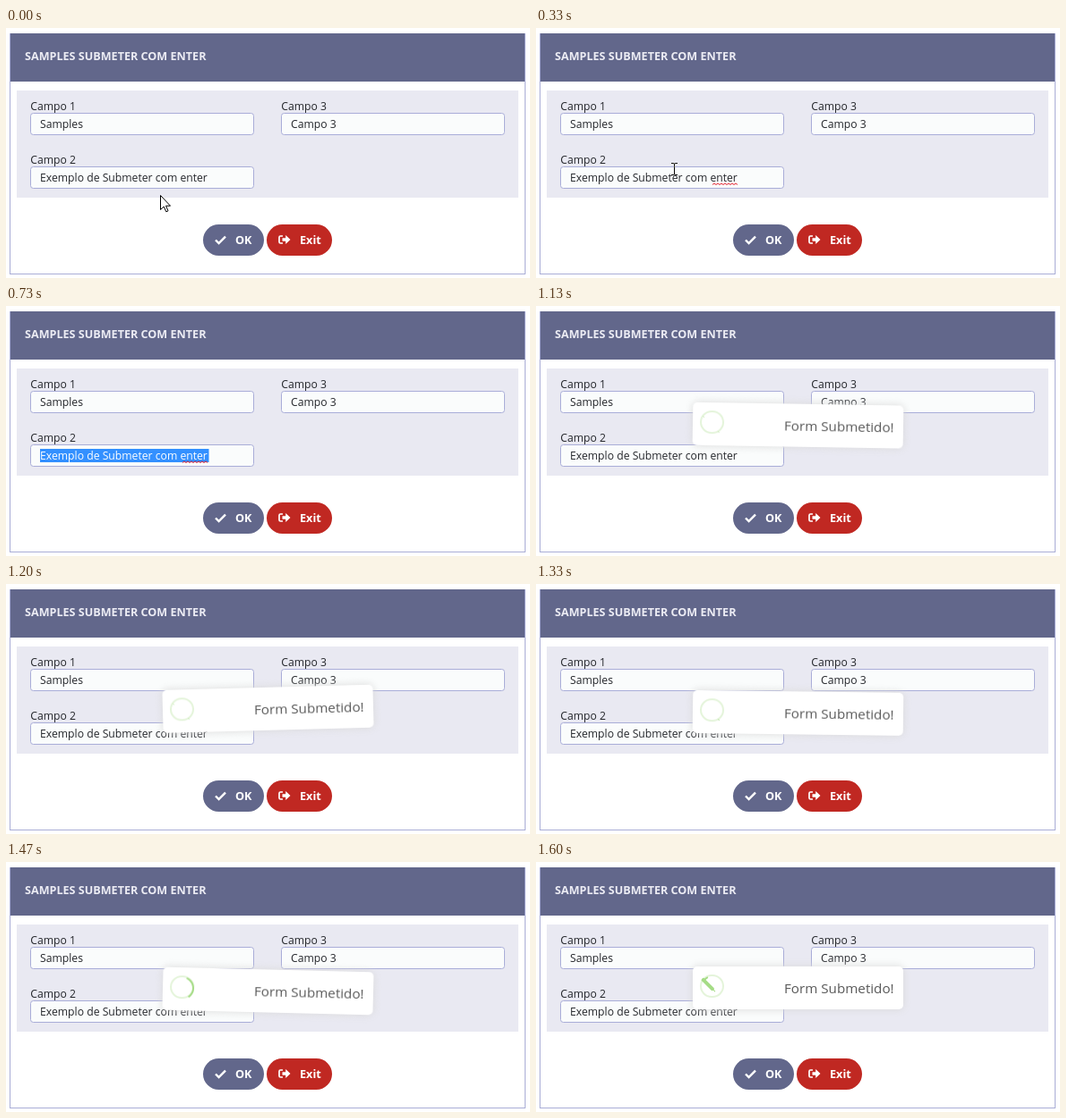
An HTML page for the animation above (1.67 s loop, 585 by 280 pixels).

```html
<!DOCTYPE html>
<html lang="pt">
<head>
<meta charset="utf-8">
<title>Submeter com enter</title>
<style>
html, body { margin: 0; width: 100%; height: 100%; overflow: hidden; background: #fff; }
#stage { position: relative; width: 585px; height: 280px; overflow: hidden; font-family: "Open Sans", "Noto Sans", sans-serif; }
svg { position: absolute; left: 0; top: 0; font-size: 12.2px; fill: #24262b; }
.field { fill: #fafcfc; stroke: #a9add8; }
.strong { font-size: 12.7px; font-weight: 700; fill: #fff; }
#ibeam { mix-blend-mode: difference; }

#toast { --age: 0; position: absolute; left: 175px; top: 117px; width: 235px; height: 48px; overflow: hidden;
  border-radius: 5px; background: #fff; box-shadow: 0 0 10px #d9d9d9; visibility: hidden; }
#toast, #toast .moving { animation: toast-in .5s calc(var(--age) * -1ms) both paused; }
.title { position: absolute; left: 102px; top: 0; font-size: 15.2px; line-height: 48px; color: #595959; white-space: nowrap; }
.icon { position: absolute; left: 9px; top: 9.5px; width: 2em; height: 2em; font-size: 11.2px;
  border: .25em solid #a5dc86; border-radius: 50%; }
.icon div { position: absolute; }
.ring { z-index: 2; left: -.25em; top: -.25em; width: 2em; height: 2em; border: .25em solid rgba(165, 220, 134, .3); border-radius: 50%; }
.mask { width: 1.6em; height: 3em; background: #fff; transform: rotate(-45deg); }
.mask.left { left: -.5em; top: -.8em; transform-origin: 2em 2em; border-radius: 4em 0 0 4em; }
.mask.right { left: .9375em; top: -.25em; transform-origin: 0 1.5em; border-radius: 0 4em 4em 0; }
.gap { z-index: 1; left: .4375em; top: 0; width: .4375em; height: 2.6875em; background: #fff; transform: rotate(-45deg); }
.line { z-index: 2; height: .3125em; border-radius: .125em; background: #a5dc86; }
.tip { transform: rotate(45deg); }
.long { transform: rotate(-45deg); }
#toast .mask.moving { animation-name: sweep; animation-duration: 4.25s; animation-timing-function: ease-in; }
#toast .tip { animation-name: tip; animation-duration: .75s; }
#toast .long { animation-name: long; animation-duration: .75s; }

@keyframes toast-in {
  0% { transform: translateY(-10px) rotate(2deg); }
  33% { transform: translateY(0) rotate(-2deg); }
  66% { transform: translateY(5px) rotate(2deg); }
  100% { transform: translateY(0) rotate(0deg); }
}
@keyframes sweep {
  0%, 5% { transform: rotate(-45deg); }
  12%, 100% { transform: rotate(-405deg); }
}
@keyframes tip {
  0% { top: .5625em; left: .0625em; width: 0; }
  54% { top: .125em; left: .125em; width: 0; }
  70% { top: .625em; left: -.25em; width: 1.625em; }
  84% { top: 1.0625em; left: .75em; width: .5em; }
  100% { top: 1.125em; left: .1875em; width: .75em; }
}
@keyframes long {
  0% { top: 1.625em; right: 1.375em; width: 0; }
  65% { top: 1.25em; right: .9375em; width: 0; }
  84% { top: .9375em; right: 0; width: 1.125em; }
  100% { top: .9375em; right: .1875em; width: 1.375em; }
}
</style>
</head>
<body>
<div id="stage">
  <svg width="585" height="280" viewBox="0 0 585 280">
    <defs><clipPath id="picked"><rect class="range" x="38" y="160" width="0" height="15"/></clipPath></defs>
    <rect width="585" height="280" fill="#fff"/>
    <rect x="4.5" y="6.5" width="575" height="269" fill="#fff" stroke="#a9add6"/>
    <rect x="5" y="6" width="574" height="54" fill="#62678b"/>
    <text class="strong" x="21" y="35.5" style="font-size:12.6px;fill:#ececf4">SAMPLES SUBMETER COM ENTER</text>
    <rect x="12" y="70" width="560" height="120" fill="#e9e9f2"/>

    <text x="27.3" y="92">Campo 1</text>
    <text x="307.3" y="92">Campo 3</text>
    <text x="27.3" y="152">Campo 2</text>
    <rect class="field" x="27.5" y="95.5" width="249" height="24" rx="3"/>
    <rect class="field" x="307.5" y="95.5" width="249" height="24" rx="3"/>
    <rect class="field" x="27.5" y="155.5" width="249" height="24" rx="3"/>
    <text x="38" y="112">Samples</text>
    <text x="318" y="112">Campo 3</text>
    <text x="38" y="172">Exemplo de Submeter com enter</text>
    <rect class="range" x="38" y="160" width="0" height="15" fill="#3390ff"/>
    <text x="38" y="172" fill="#fff" clip-path="url(#picked)">Exemplo de Submeter com enter</text>
    <path id="squiggle" fill="none" stroke="#e5202c"/>

    <rect x="220" y="220" width="68" height="35" rx="17.5" fill="#62678b"/>
    <path d="M234 237.5l3.6 3.6l7.4-7.4" fill="none" stroke="#fff" stroke-width="2.4"/>
    <text class="strong" x="256" y="242">OK</text>
    <rect x="291" y="220" width="73" height="35" rx="17.5" fill="#c02822"/>
    <path d="M309 233h-2.6q-1.4 0-1.4 1.4v5.2q0 1.4 1.4 1.4h2.6" fill="none" stroke="#fff" stroke-width="1.7"/>
    <path d="M308.5 235.3h3.7v-3.2l5.3 4.9l-5.3 4.9v-3.2h-3.7z" fill="#fff"/>
    <text class="strong" x="328" y="242">Exit</text>

    <path id="arrow" d="M.5.5V16.5L4.2 13L6.8 18.8L9 17.8L6.5 12.2H11.5Z" fill="#fff" stroke="#000"/>
    <path id="ibeam" d="M-3-6.5H-1L.5-6L2-6.5H4M.5-6V6M-3 6.5H-1L.5 6L2 6.5H4" fill="none" stroke="#fff"/>
  </svg>
  <div id="toast">
    <div class="icon">
      <div class="mask left"></div>
      <div class="mask right moving"></div>
      <div class="gap"></div>
      <div class="ring"></div>
      <div class="line tip moving"></div>
      <div class="line long moving"></div>
    </div>
    <div class="title">Form Submetido!</div>
  </div>
</div>
<script>
const LOOP = 1670, TICK = 200 / 3, TOAST_TICK = 17, TOAST_LEAD = 31;
const byId = id => document.getElementById(id);
const ranges = document.querySelectorAll('.range');
const toast = byId('toast'), squiggle = byId('squiggle');
squiggle.setAttribute('d', 'M197 175.5' + 'l2-1.6l2 1.6'.repeat(7));

// Pointer poses: starting tick, shape, x, y
const poses = [
  [0, 'arrow', 172, 187], [1, 'ibeam', 166, 172], [2, 'ibeam', 157, 161], [3, 'ibeam', 154, 158],
  [9, 'arrow', 112, 196], [10, 'arrow', 38, 266], [11, 'none', 0, 0]
];
// Selected spans: starting tick, left, right
const spans = [[0, 38, 38], [6, 109, 164], [7, 38, 226.5], [TOAST_TICK, 38, 38]];

const tickStart = k => Math.round(k * TICK / 10) * 10;
const current = (list, k) => list.filter(([start]) => start <= k).pop();
const show = (el, on) => { el.style.visibility = on ? 'visible' : 'hidden'; };

function draw(k) {
  const [, shape, x, y] = current(poses, k);
  for (const id of ['arrow', 'ibeam']) {
    show(byId(id), id === shape);
    byId(id).setAttribute('transform', `translate(${x} ${y})`);
  }
  const [, left, right] = current(spans, k);
  ranges.forEach(r => {
    r.setAttribute('x', left);
    r.setAttribute('width', right - left);
  });
  show(squiggle, k >= 5 && k < TOAST_TICK);
  show(toast, k >= TOAST_TICK);
  toast.style.setProperty('--age', Math.max(0, TOAST_LEAD + (k - TOAST_TICK) * TICK));
}

const begin = performance.now();
function frame() {
  const t = (performance.now() - begin) % LOOP;
  let k = 24;
  while (k > 0 && tickStart(k) > t) k--;
  draw(k);
  requestAnimationFrame(frame);
}
frame();
</script>
</body>
</html>
```
